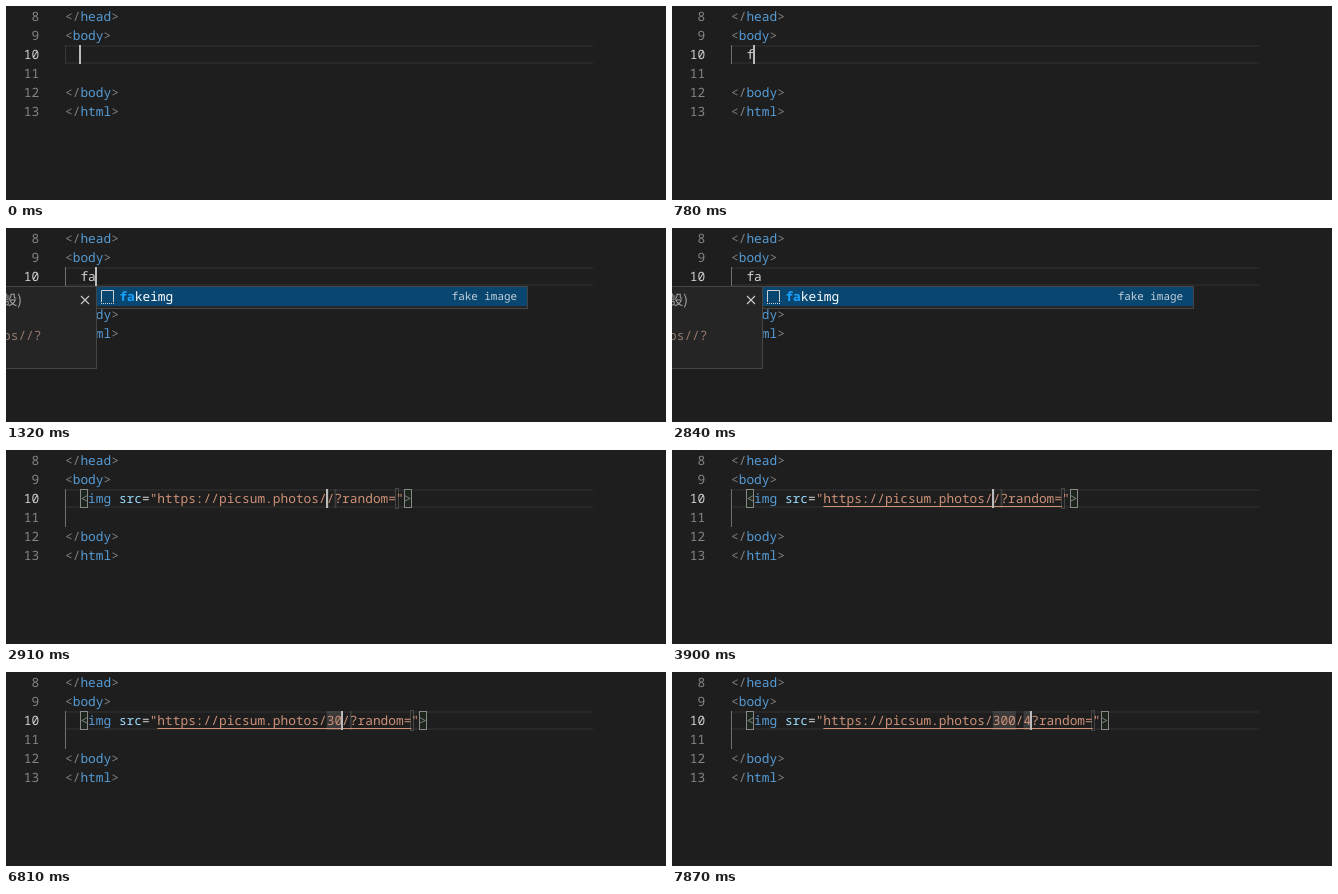
Recreate the animation shown at these times as an HTML page. Size 660 by 194 pixels, loop 8 s.

```html
<!DOCTYPE html>
<html lang="en">
<head>
<meta charset="utf-8">
<title>Snippet typing</title>
<style>
  html, body { margin: 0; width: 100%; height: 100%; overflow: hidden; background: #1e1e1e; }
  svg { display: block; }
  text {
    font: 12.83px "Noto Sans Mono", "DejaVu Sans Mono", monospace;
    text-rendering: geometricPrecision;
    white-space: pre;
  }
  .detail { font-size: 10.9px; }
  .title { font: 14px "Noto Sans CJK TC", "Noto Sans CJK", "Noto Sans CJK JP", sans-serif; }
  .match { font-weight: bold; fill: #18a3ff; }
</style>
</head>
<body>
<svg id="stage" width="660" height="194" viewBox="0 0 660 194"></svg>
<script>
const LOOP = 8000, CHAR = 7.698, LEFT = 59, LINE = 19, ROW = 39;
const GREY = '#808080', BLUE = '#569cd6', ATTR = '#9cdcfe', STR = '#ce9178', PLAIN = '#d4d4d4';
const ITEMS = ['fakeimg', 'fieldset', 'fieldset:d', 'fieldset:disabled', 'fig', 'figc', 'figcaption'];

// Each step: start time and the properties that change there.
const STEPS = [
  [0, { typed: '', popup: false, img: false, link: false, w: '', h: '', caret: 2, on: true }],
  [320, { on: false }],
  [780, { typed: 'f', caret: 3, on: true }],
  [850, { popup: true }],
  [1320, { typed: 'fa', caret: 4 }],
  [1850, { on: false }],
  [2310, { on: true }],
  [2840, { on: false }],
  [2910, { typed: '', popup: false, img: true, caret: 34, on: true }],
  [3370, { on: false }],
  [3900, { on: true, link: true }],
  [4360, { on: false }],
  [4890, { on: true }],
  [5350, { on: false }],
  [5880, { on: true }],
  [6350, { on: false }],
  [6680, { w: '3', caret: 35, on: true }],
  [6810, { w: '30', caret: 36 }],
  [7070, { w: '300', caret: 37 }],
  [7340, { caret: 38 }],
  [7800, { on: false }],
  [7870, { h: '4', caret: 39, on: true }]
];

const stage = document.getElementById('stage');
const esc = s => s.replace(/&/g, '&amp;').replace(/</g, '&lt;');
const colX = col => LEFT + col * CHAR;
const rect = (x, y, w, h, fill, extra = '') =>
  `<rect x="${x}" y="${y}" width="${w}" height="${h}" fill="${fill}" ${extra}/>`;
const frame = (x, y, w, h, fill, stroke) =>
  rect(x + .5, y + .5, w - 1, h - 1, fill, `stroke="${stroke}"`);
const label = (x, y, s, fill, extra = '') =>
  `<text x="${x}" y="${y}" fill="${fill}" ${extra}>${esc(s)}</text>`;

// Coloured pieces of code, one after the other on the character grid.
function code(col, top, parts) {
  return parts.map(([s, fill]) => {
    const out = label(colX(col), top + 14, s, fill);
    col += s.length;
    return out;
  }).join('');
}

function page() {
  let out = '';
  for (let n = 8; n <= 13; n++) {
    const y = 1 + (n - 8) * LINE + 14;
    out += label(33.2, y, String(n), n === 10 ? '#d0d0d0' : '#858585', 'text-anchor="end"');
  }
  out += rect(LEFT, ROW, 528, 2, '#282828') + rect(LEFT, ROW + 17, 528, 2, '#282828');
  const tags = [['</', 'head', 1], ['<', 'body', 20], ['</', 'body', 77], ['</', 'html', 96]];
  for (const [open, name, top] of tags)
    out += code(0, top, [[open, GREY], [name, BLUE], ['>', GREY]]);
  return out;
}

function imgTag(s) {
  const slot = (col, len) =>
    rect(colX(col), ROW, Math.max(2, len * CHAR), LINE, '#7c7c7c', 'fill-opacity=".3"');
  const bracket = col => frame(Math.round(colX(col)), ROW, 8, LINE, '#1c251c', '#888');
  const url = `https://picsum.photos/${s.w}/${s.h}?random=`;
  const end = 12 + url.length;
  return bracket(2) + bracket(end + 1) +
    slot(34, s.w.length) + slot(35 + s.w.length, s.h.length) +
    frame(Math.floor(colX(end)) - 1, ROW - 1, 4, LINE + 2, 'none', '#464646') +
    code(2, ROW, [['<', GREY], ['img', BLUE], [' src', ATTR], ['=', PLAIN],
      ['"' + url + '"', STR], ['>', GREY]]) +
    (s.link ? rect(colX(12), ROW + 17, url.length * CHAR, 1, STR) : '');
}

const SNIPPET = '<path d="M2.5 13V1.5h12V13M2 14.5h13" stroke-dasharray="none"/>'
  .replace('M2 14.5h13" stroke-dasharray="none', '" /><path d="M2 14.5h13" stroke-dasharray="1 1');
const WRENCH = '<path d="M2 12.2L7.2 7A3.8 3.8 0 0 1 12.2 1.8L9.8 4.4L11.6 6.2' +
  'L14.2 3.8A3.8 3.8 0 0 1 9 8.8L3.8 14A1.3 1.3 0 0 1 2 12.2Z"/>';

function docs(right, textFill) {
  const x = right - 12;
  return frame(-10, 58, right + 10, 83, '#252526', '#454545') +
    label(right - 75, 77, '設)', '#a8a8a8', 'class="title" text-anchor="end"') +
    label(right - 55.5, 112, 's//?'.padStart(5, 'o'), textFill, 'text-anchor="end"') +
    `<path d="M${x - 4} 68l8 8m0-8l-8 8" stroke="#ccc" stroke-width="1.1"/>`;
}

function popup(s) {
  const n = s.typed.length, x = n === 1 ? 82 : 90;
  const rows = ITEMS.filter(item => item.startsWith(s.typed));
  let out = docs(x + (n === 1 ? 0 : 1), n === 1 ? '#b08a78' : '#967a6d');
  out += frame(x, 58, 432, rows.length * LINE + 4, '#252526', '#454545');
  rows.forEach((item, i) => {
    const y = 59 + i * LINE, tx = x + 23.4;
    if (!i) out += rect(x + 1, y, 430, LINE, '#094771');
    out += `<g transform="translate(${x + 3} ${y + 2})" fill="none" stroke="#d0d0d0">` +
      `${i ? WRENCH : SNIPPET}</g>` +
      label(tx, y + 14, s.typed, '#18a3ff', 'class="match"') +
      label(tx + n * CHAR, y + 14, item.slice(n), i ? PLAIN : '#fff');
    if (!i) out += label(x + 421, y + 13, 'fake image', '#c4d0da', 'class="detail" text-anchor="end"');
  });
  return out;
}

function draw(s) {
  let out = page();
  const guide = s.img ? 2 * LINE : LINE;
  out += rect(LEFT, ROW, 1, guide, s.typed || s.img ? '#707070' : '#383838');
  out += s.img ? imgTag(s) : code(2, ROW, [[s.typed, PLAIN]]);
  if (s.on) out += rect(Math.floor(colX(s.caret) - .5), ROW, 2, LINE, '#bbb');
  if (s.popup) out += popup(s);
  stage.innerHTML = out;
}

let shown = -1;
function tick() {
  const t = performance.now() % LOOP;
  const now = STEPS.filter(([start]) => start <= t).length;
  if (now !== shown) {
    shown = now;
    draw(Object.assign({}, ...STEPS.slice(0, now).map(([, change]) => change)));
  }
  requestAnimationFrame(tick);
}
tick();
</script>
</body>
</html>
```
